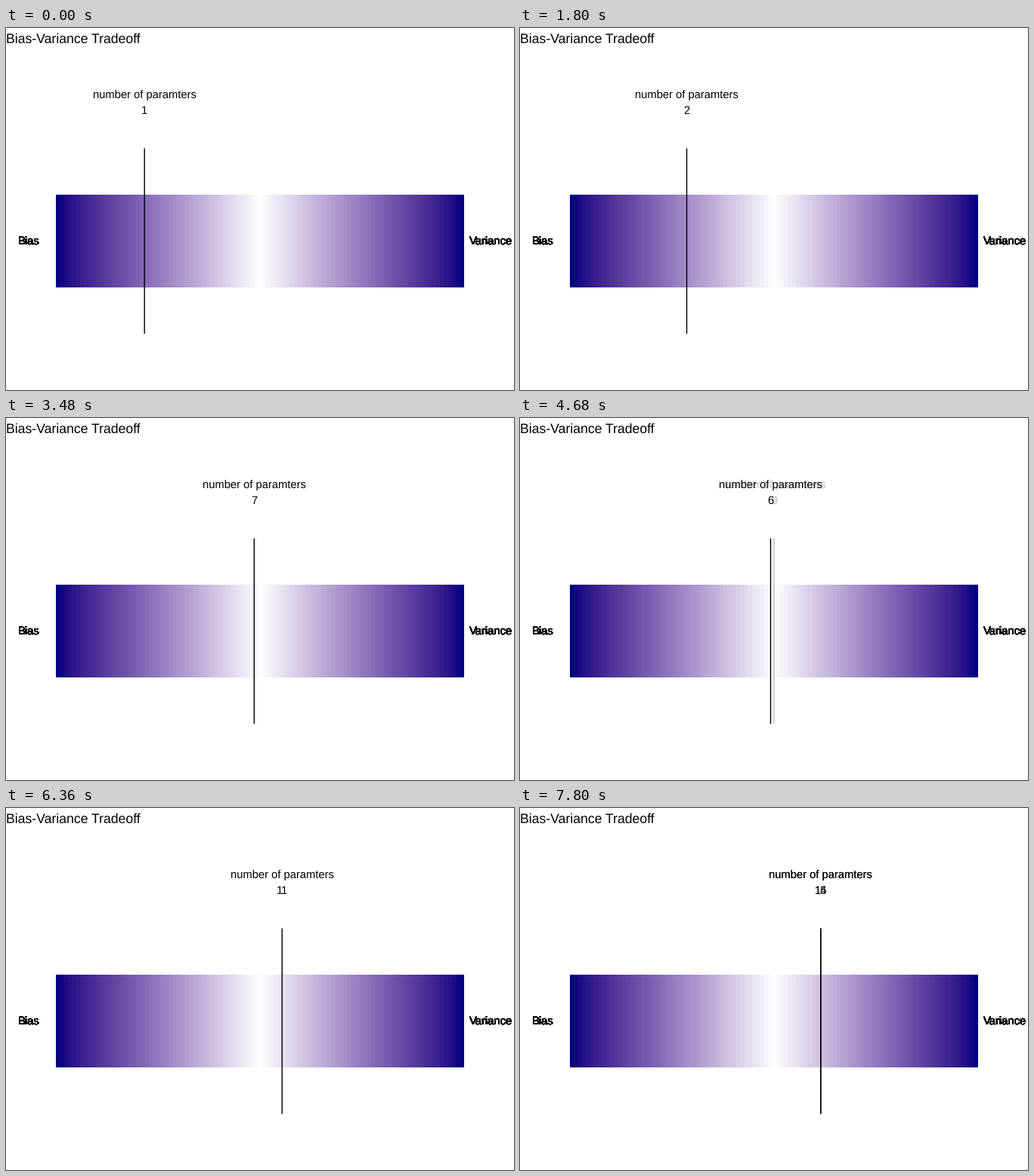
Recreate the animation shown at these times as a matplotlib script. Size 672 px wide and 480 px high, loop 8 s.

```python
import numpy as np
import matplotlib.pyplot as plt
from matplotlib.animation import FuncAnimation

W, H, DPI = 672, 480, 96
STEP, LOOP, TICK = 40, 8000, 120
FONT_PT, LINE_W = 11.05, 1.42
LABEL_MID, CAPTION_Y, NUMBER_Y = 98.3, 93, 114

# (marker x, parameter count, second count sharing the same x)
STATES = [
    (183.2, 1, None), (207.2, 3, None), (209.6, 2, None), (253.4, 4, None),
    (253.4, 5, None), (328.3, 7, None), (330.0, 6, None), (336.0, 8, 9),
    (347.5, 10, None), (365.2, 11, None), (381.3, 12, None), (397.8, 14, 15),
]

plt.rcParams["font.family"] = "Liberation Sans"
plt.rcParams["text.hinting"] = "none"

fig = plt.figure(figsize=(W / DPI, H / DPI), dpi=DPI, facecolor="white")
ax = fig.add_axes([0, 0, 1, 1])
ax.set_xlim(0, W)
ax.set_ylim(H, 0)
ax.axis("off")


def lab_blend(t):
    """Blend white (t=0) to navy (t=1) in CIE Lab, returned as sRGB."""
    white, navy = np.array([100, 0, 0]), np.array([12.97, 47.5, -64.7])
    lab = white + np.asarray(t)[:, None] * (navy - white)
    fy = (lab[:, 0] + 16) / 116
    f = np.stack([fy + lab[:, 1] / 500, fy, fy - lab[:, 2] / 200], axis=1)
    xyz = np.where(f > 6 / 29, f ** 3, 3 * (6 / 29) ** 2 * (f - 4 / 29))
    xyz = xyz * [0.9505, 1.0, 1.089]
    to_rgb = np.array([[3.2406, -1.5372, -0.4986],
                       [-0.9689, 1.8758, 0.0415],
                       [0.0557, -0.2040, 1.0570]])
    rgb = np.clip(xyz @ to_rgb.T, 0, 1)
    return np.where(rgb <= 0.0031308, 12.92 * rgb,
                    1.055 * rgb ** (1 / 2.4) - 0.055)


bar = lab_blend(np.abs(np.linspace(-1, 1, 101)))[None]
ax.imshow(np.clip(bar, 0, 1), extent=(66, 606, 344, 221), aspect="auto",
          interpolation="nearest", zorder=1)
ax.set_xlim(0, W)
ax.set_ylim(H, 0)

ax.text(0, 20, "Bias-Variance Tradeoff", fontsize=13.2, va="baseline")

# Stacked copies harden the glyph edges
for x, word in ((30.5, "Bias"), (641.3, "Variance")):
    for _ in range(30):
        ax.text(x, 288, word, fontsize=FONT_PT, ha="center", va="baseline")


class Marker:
    """Vertical line with a two-line label above it."""

    def __init__(self):
        self.line, = ax.plot([0, 0], [159.5, 405.5], color="black", zorder=3,
                             solid_capstyle="butt", snap=False)
        self.texts = [ax.text(0, y, "", ha="center", va="baseline", zorder=4)
                      for y in (CAPTION_Y, NUMBER_Y)]
        self.texts[0].set_text("number of paramters")

    def hide(self):
        for a in (self.line, *self.texts):
            a.set_visible(False)

    def show(self, x, count, alpha=1.0, scale=1.0):
        self.line.set_xdata([x, x])
        self.line.set_linewidth(LINE_W * scale * 72 / DPI)
        self.texts[1].set_text(str(count))
        for text, y in zip(self.texts, (CAPTION_Y, NUMBER_Y)):
            text.set_position((x, LABEL_MID + scale * (y - LABEL_MID)))
            text.set_fontsize(FONT_PT * scale)
        for a in (self.line, *self.texts):
            a.set_alpha(alpha)
            a.set_visible(True)


twin, main = Marker(), Marker()


def draw(frame):
    i, phase = divmod(frame * STEP // TICK, 6)
    p = max(0, phase - 2) / 3
    e = (1 - np.cos(np.pi * p)) / 2
    x0, n0, twin0 = STATES[i]
    x1, n1, twin1 = STATES[min(i + 1, len(STATES) - 1)]

    main.show(x0 + (x1 - x0) * e, n0 if p < 0.5 else n1)
    if twin0 is not None and p < 1:
        twin.show(x0, twin0, scale=1 - e)
    elif twin1 is not None and p > 0:
        twin.show(x1, twin1, alpha=e)
    else:
        twin.hide()
    return [main.line, *main.texts, twin.line, *twin.texts]


anim = FuncAnimation(fig, draw, frames=LOOP // STEP, interval=STEP,
                     init_func=lambda: draw(0), repeat=True, repeat_delay=0)
plt.show()
```
